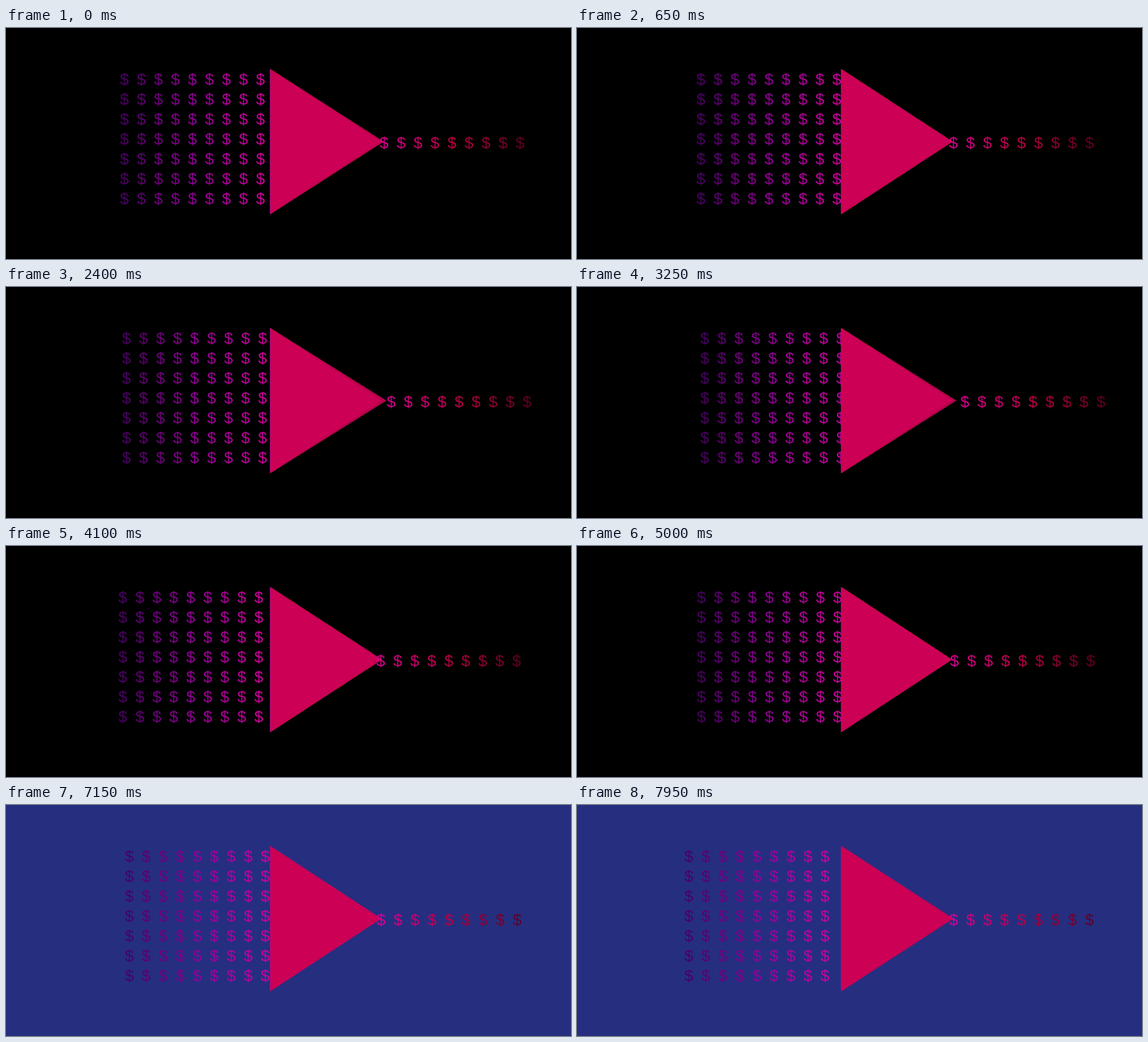
An HTML page with a canvas for the animation above (8 s loop, 739 by 302 pixels).

```html
<!DOCTYPE html>
<html lang="en">
<head>
<meta charset="utf-8">
<style>
  html, body { margin: 0; width: 100%; height: 100%; overflow: hidden; background: #000; }
  canvas { display: block; }
</style>
</head>
<body>
<canvas width="739" height="302"></canvas>
<script>
const ctx = document.querySelector('canvas').getContext('2d');
const LOOP = 8000, CUT = 5100, PAUSE = 128;
const COLUMNS = 9, ROWS = 7, STEP = 22.23;
const INCOMING = [[75, 0, 100], [148, 0, 152], [208, 0, 158]];
const OUTGOING = [[218, 0, 145], [185, 0, 68], [96, 0, 36]];

const fract = v => v - Math.floor(v);
const smooth = u => u * u * (3 - 2 * u);

function columnColor(stops, column) {
  const p = column / (COLUMNS - 1) * 2;
  const i = Math.min(1, Math.floor(p));
  const mixed = stops[i].map((v, k) => Math.round(v + (stops[i + 1][k] - v) * (p - i)));
  return `rgb(${mixed})`;
}

function dollars(x, baseline, stops) {
  for (let c = 0; c < COLUMNS; c++) {
    ctx.fillStyle = columnColor(stops, c);
    ctx.fillText('$', x + c * STEP, baseline);
  }
}

function triangle(tip, color) {
  ctx.fillStyle = color;
  ctx.beginPath();
  ctx.moveTo(345.5, 53.5);
  ctx.lineTo(tip, 148.5);
  ctx.lineTo(345.5, 243.5);
  ctx.fill();
}

function draw(time) {
  const onBlue = time >= CUT;
  // The flow halts briefly when the background switches.
  const flow = onBlue ? Math.max(CUT, time - PAUSE) : time;

  ctx.fillStyle = onBlue ? '#262e80' : '#000';
  ctx.fillRect(0, 0, 739, 302);
  ctx.font = '21px "Liberation Sans", Arial, sans-serif';
  ctx.textAlign = 'center';

  const inX = 145.5 + 23.6 * fract(flow / 2150 + 0.4);
  for (let r = 0; r < ROWS; r++) dollars(inX, 74 + r * 26, INCOMING);

  const pulse = 3.6 + 3.6 * Math.sin(time / 1050 * 2 * Math.PI);
  triangle(490.5 + pulse, '#b8004c');
  triangle(490.5, '#cc0055');
  ctx.fillStyle = 'rgba(130, 30, 160, 0.6)';
  ctx.fillRect(345, 54, 1, 189);

  const outX = 490 + 18.5 * smooth(fract(flow / 717 + 0.32));
  dollars(outX, 157, OUTGOING);
}

const start = performance.now();
function frame() {
  draw((performance.now() - start) % LOOP);
  requestAnimationFrame(frame);
}
frame();
</script>
</body>
</html>
```
